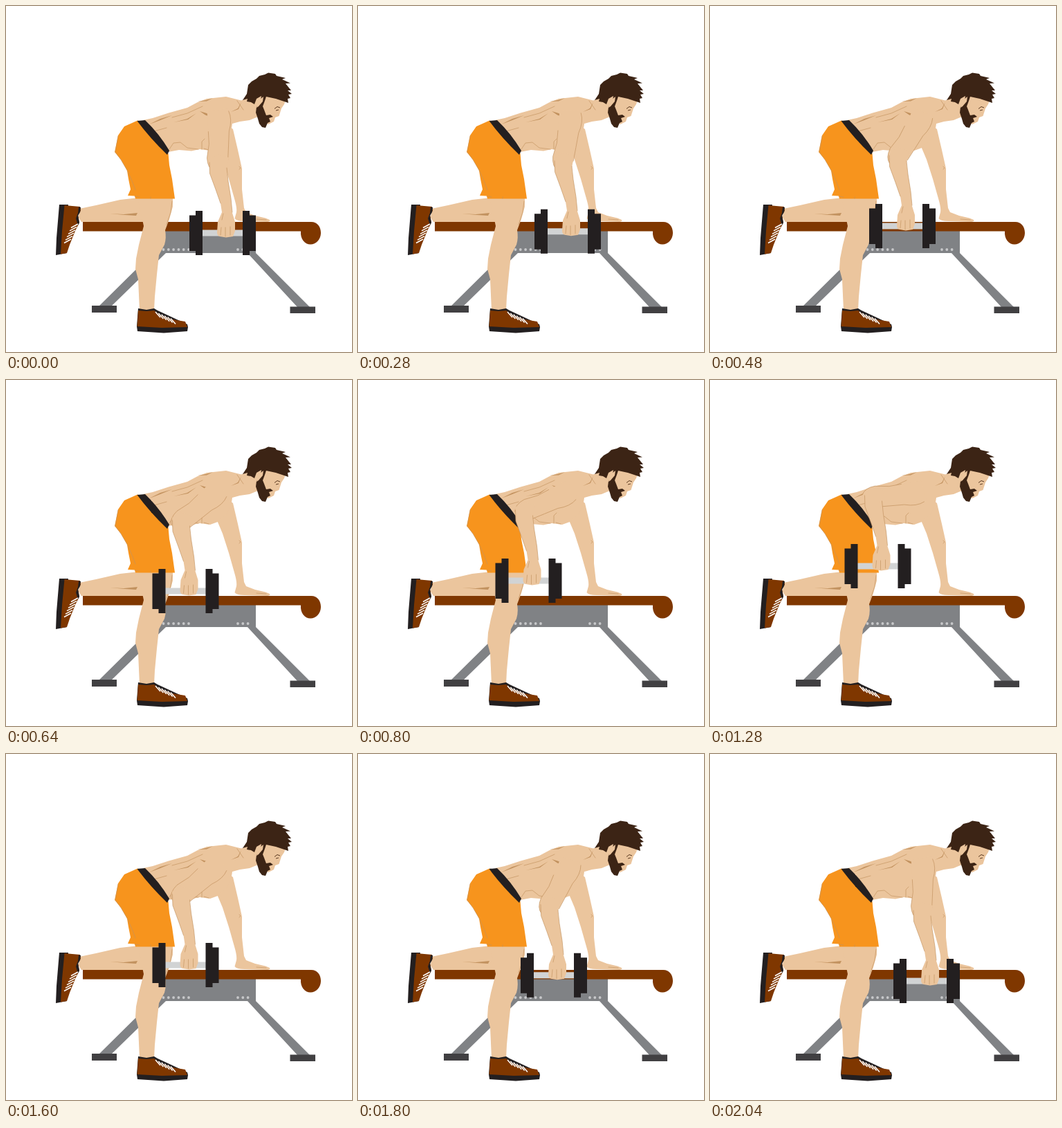
Recreate the animation shown at these times as an HTML page. Size 500 px wide and 500 px high, loop 2200 ms.

```html
<!DOCTYPE html>
<html lang="en">
<head>
<meta charset="utf-8">
<title>Dumbbell row</title>
<style>
html, body { margin: 0; width: 100%; height: 100%; overflow: hidden; background: #fff; }
svg { display: block; width: 100vw; height: 100vh; }
.skin { fill: #ebc59d; }
.brown { fill: #7f3700; }
.black { fill: #231f20; }
.grey { fill: #808285; }
.foot { fill: #414042; }
.hair { fill: #3c2415; }
.line { fill: none; stroke: #c2925f; stroke-width: .65; stroke-linecap: round; stroke-linejoin: round; }
.fold { fill: #c2925f; }
.lace { stroke: #fff; stroke-width: 1.5; }
</style>
</head>
<body>
<svg viewBox="0 0 500 500">
  <!-- bench -->
  <path class="grey" d="M135 433L222 347V325H361V357L439 435H421L349 357H231L153 433Z"/>
  <path class="foot" d="M124 433H160V443H124ZM410.500 434.500H447V444H410.500Z"/>
  <g id="dots" fill="#c7c8ca"></g>
  <path class="brown" d="M111 312H441C450 312 455 319 455 328C455 337 448 344.500 440 344.500C432 344.500 425 337 426 325.500H111Z"/>

  <!-- supporting arm -->
  <path class="skin" d="M305 203L313 222L322 250L330.500 280Q334 292 333 298L330.500 307Q333 311 345 311L378 312Q383 311 381 309L375 306.500L360 303L347 298L344 292L341 265V235L335 208L328 178L312 165Z"/>
  <path class="line" d="M337 232L339 234L337 236M362 308L376 309"/>

  <!-- kneeling leg -->
  <path class="skin" d="M106 293L130 288L165 280L192 277L202 312H109L105 306Z"/>
  <path class="fold" d="M150 300L170 301L190 299L188 303L172 302Z"/>
  <path class="black" d="M77 287L90 287L84 330L88 357L72 360L73 335Z"/>
  <path class="brown" d="M84.500 288L107 290L108 296L104 301L106 313L100 325L92 345L88 357L79 358.500L81 325Z"/>
  <path class="black" d="M105 290.500L108 291L107 298L104 303L106 313L104 317L101 307L104 299Z"/>
  <g id="kneelLaces"></g>

  <!-- standing leg -->
  <path class="skin" d="M190 275L199 318L192 345L188 365L187 380L191 395L193 440H214L215 420L218 388L221 360L229 345Q232 335 230 324L236 308L241 290V275Z"/>
  <path class="line" d="M240 282L238 298L232 316"/>
  <path class="black" d="M191 437L203 439L214 437L219 440L262 460L263 464L262 470L228 472.500L190 470L189 463Z"/>
  <path class="brown" d="M191 440L203 441L214 440L222 446L241 453L259 456L262 464L225 465L189.500 463Z"/>
  <g id="standLaces"></g>

  <!-- torso -->
  <path class="skin" d="M198 165L212 162L235 154.500L262 147L277 139L290 134L318 131L340 136.500L357 130L376 140L364 160L352 165L338 167L327 170L325 183L318 195L306 205L295 209L280 207L268 209.500L250 208L234 211Z"/>
  <path class="line" d="M214 181L232 176M240 161L262 155L284 145M236 207L242 198L252 197L262 205L278 207M283 207V196L287 192M286 206L293 208M334 137L343 150"/>
  <path class="fold" d="M207 171L223 163L240 158L223 165ZM243 168L262 163L275 155L263 164ZM277 138L289 136L299 133L290 137.500ZM280 152L290 155L298 161L288 157.500ZM325 153L335 148L340 139L336 149Z"/>

  <!-- shorts -->
  <path fill="#f7941d" d="M190 165.500L171 174L162 187L157 211L166 222L175 238L177 250L180 265L176 274L186 274.500L187 278.500H244L240 250L236 230L234.500 213L200 168Z"/>
  <path class="line" d="M162 188L158 211L166 222L175 237L183 255L187 266M186 275L193 276M209 276V278"/>
  <path class="black" d="M189.500 166L201 165Q221 184 236 209L233 215Q208 191 189.500 166Z"/>

  <!-- head -->
  <path class="skin" d="M362 132L376 126L404 136L402 142L398 148L394.500 159L389 161L387 167L379 171L366 162Z"/>
  <path class="hair" d="M342 136L348 127L350 114L355 109L362 105L366 101L374 99L379 96.500L389 98L391 101L404 104L399 106L411 111.500L404 112L412 122L407 122L413 127L408 128L411 133L407 134L408 140L402 138L390 134L376 131L374 137L371 145L373 150L376 158L382 157L386 160L380 162L382 167L378 169L375 176L370 175L366 170L364 163L361 154L362 146L368 136L369 130L362 134L359 142L354 139L348 138L349 134Z"/>
  <path class="skin" d="M364 137L372 131L371 138L365 145L362 147Z"/>
  <path d="M388 148.500L392 145.500L396 147M390 151L394 150" fill="none" stroke="#5b3a21"/>

  <!-- working arm -->
  <g id="upper">
    <path class="skin" d="M-5 11L40 11L62 15Q77 15 82 6Q83 -5 74 -13L64 -15L25 -19Q4 -26 -8 -19Z"/>
    <path class="line" d="M24 11L42 11L62 15Q77 15 82 6M66 -15L46 -17L25 -19Q8 -25 -4 -20"/>
  </g>
  <g id="lower">
    <path fill="#d1d3d4" d="M283 323.500H343V332.500H283Z"/>
    <path class="black" d="M265 302.500H274V296H284V360H274V354H265ZM342 296H352V302.500H361V354H352V360H342Z"/>
    <path class="skin" d="M293.500 222L294.500 242L303 265L310 285L312 298L306 312L305 327Q305 332 309 333L318 334.500L328 333L331 325V312L327 299L325 278L321 253L319 236L322 219L306 214Z"/>
    <path class="line" d="M294 226L294.500 242L303 265L310 285M319 234L321 253L325 278L327 298M311 320L310 331M317 320V333M324 319V331M314 300L312 309"/>
  </g>
</svg>
<script>
const byId = id => document.getElementById(id);
const upper = byId("upper"), lower = byId("lower");
const LOOP = 2200, TICK = 40, PEAK = 1120, LIFT = 920;
const shoulder = [302, 157], elbow = [306, 228];

// lift time in ms, then the forearm's shift in x and y
const path = [
  [0, 0, 0], [140, -17.5, -4], [280, -35, -10], [440, -53.5, -23],
  [600, -66.5, -38], [760, -70.5, -59], [840, -73, -65], [LIFT, -74, -68]
];

function repeat(id, count, part) {
  byId(id).innerHTML += Array.from({ length: count }, (_, i) => part(i)).join("");
}

const dot = x => `<circle cx="${x}" cy="352" r="1.9"/>`;
const lace = (x, y, dx, dy) => `<path class="lace" d="M${x} ${y}l${dx} ${dy}"/>`;

repeat("dots", 6, i => dot(227.5 + i * 7.3));
repeat("dots", 3, i => dot(335 + i * 7.3));
repeat("standLaces", 6, i => lace(216 + i * 4.4, 442 + i * 1.9, 7, 8));
repeat("kneelLaces", 6, i => lace(104 - i * 2, 315 + i * 4.4, -10, 5.5));

function shiftAt(u) {
  const i = Math.max(1, path.findIndex(p => p[0] >= u));
  const a = path[i - 1], b = path[i];
  const f = (u - a[0]) / (b[0] - a[0]);
  return [1, 2].map(n => a[n] + (b[n] - a[n]) * f);
}

function draw(time) {
  const t = Math.floor(time % LOOP / TICK) * TICK;
  const [dx, dy] = shiftAt(Math.max(0, LIFT - Math.abs(t - PEAK)));
  const [sx, sy] = shoulder;
  const angle = Math.atan2(elbow[1] + dy - sy, elbow[0] + dx - sx) * 180 / Math.PI;
  upper.setAttribute("transform", `translate(${sx} ${sy}) rotate(${angle})`);
  lower.setAttribute("transform", `translate(${dx} ${dy})`);
}

const start = performance.now();
function loop() {
  draw(performance.now() - start);
  requestAnimationFrame(loop);
}
loop();
</script>
</body>
</html>
```
